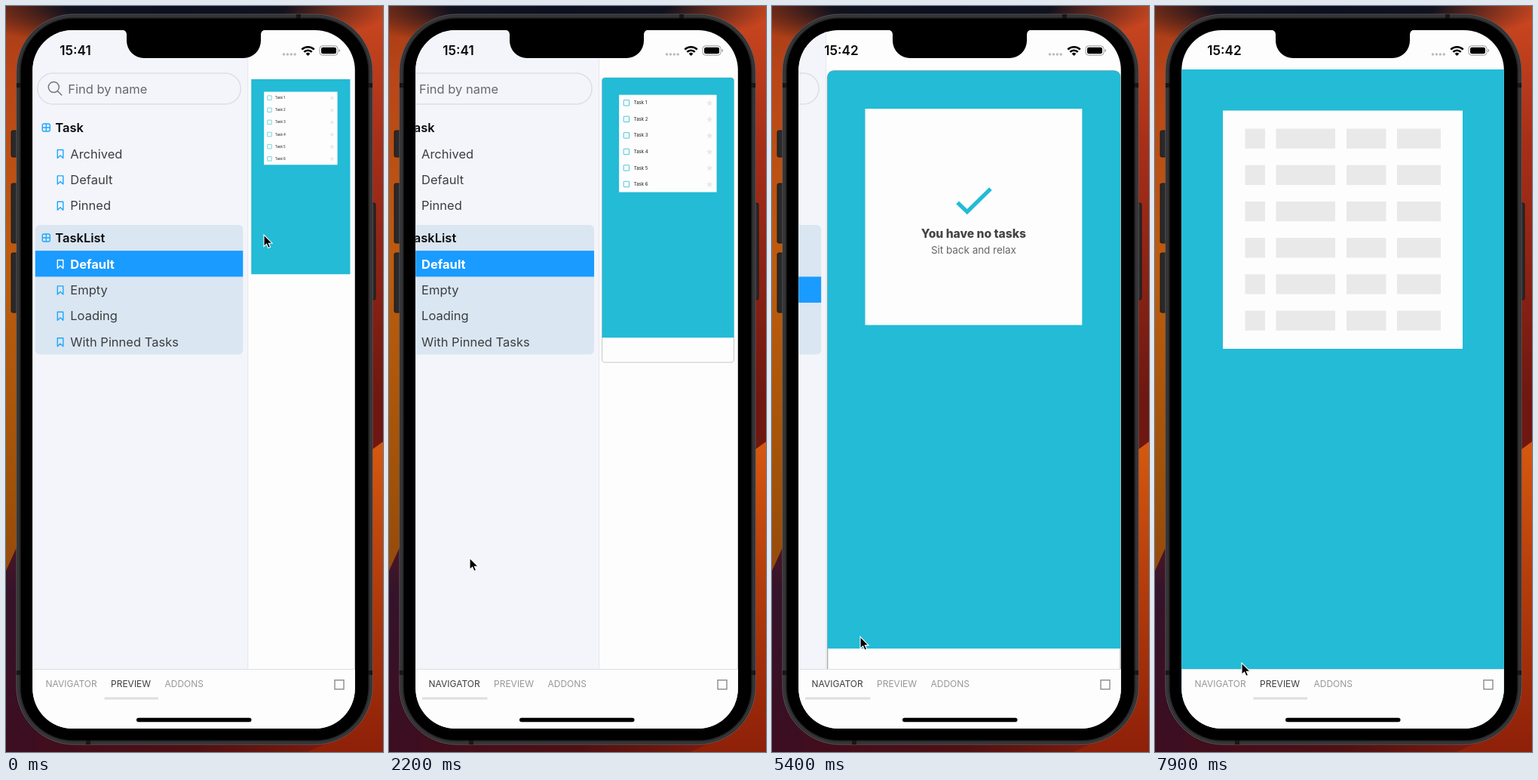
These frames come from a looping animation (500x988 px, 8 s). An HTML page:

```html
<!DOCTYPE html>
<html lang="en">
<head>
<meta charset="utf-8">
<title>Story browser on a phone</title>
<style>
html, body { margin: 0; width: 100%; height: 100%; overflow: hidden; background: #000; }
svg { display: block; width: 100%; height: 100%; }
text { font-family: Inter, "Liberation Sans", sans-serif; font-size: 16.5px; fill: #3c3e42; }
.head { font-weight: 600; fill: #0a0a0c; }
.icon { fill: none; stroke: #1ea7fd; stroke-width: 1.4; stroke-linejoin: round; }
.row rect { fill: none; }
.row.on rect { fill: #1a9bff; }
.row.on text { fill: #fff; font-weight: 700; }
.row.on .icon { stroke: #fff; }
.tab { font-size: 12px; fill: #979797; }
.tab.on { fill: #3d3d3d; }
.mid { text-anchor: middle; }
.scene { display: none; }
.scene.on { display: inline; }
</style>
</head>
<body>
<svg viewBox="0 0 500 988" preserveAspectRatio="none">
  <defs>
    <radialGradient id="night">
      <stop offset="0" stop-color="#0b1020"/><stop offset=".5" stop-color="#10121f"/>
      <stop offset="1" stop-color="#2a1518" stop-opacity="0"/>
    </radialGradient>
    <linearGradient id="left" x2="0" y2="1">
      <stop offset="0" stop-color="#a53a16"/><stop offset=".1" stop-color="#b94518"/>
      <stop offset=".38" stop-color="#bd5c0e"/><stop offset=".7" stop-color="#a05208"/>
      <stop offset="1" stop-color="#8b4010"/>
    </linearGradient>
    <linearGradient id="right" x2="0" y2="1">
      <stop offset="0" stop-color="#cb4820"/><stop offset=".2" stop-color="#a82f18"/>
      <stop offset=".58" stop-color="#6e1811"/>
    </linearGradient>
    <linearGradient id="low" x2="0" y2="1">
      <stop offset="0" stop-color="#d6590f"/><stop offset=".4" stop-color="#b8400c"/>
      <stop offset="1" stop-color="#8e2009"/>
    </linearGradient>
    <linearGradient id="plum" x2="0" y2="1">
      <stop offset="0" stop-color="#5a1a20"/><stop offset=".35" stop-color="#35132a"/>
      <stop offset="1" stop-color="#3d0d20"/>
    </linearGradient>
    <linearGradient id="base">
      <stop offset="0" stop-color="#3d0d20"/><stop offset=".5" stop-color="#4e1013"/>
      <stop offset="1" stop-color="#8e2009"/>
    </linearGradient>
    <clipPath id="screen"><rect x="35.3" y="32" width="427.5" height="925" rx="53"/></clipPath>
  </defs>

  <!-- wallpaper -->
  <rect width="500" height="988" fill="url(#base)"/>
  <rect width="250" height="900" fill="url(#left)"/>
  <rect x="250" width="250" height="900" fill="url(#right)"/>
  <ellipse cx="225" cy="0" rx="290" ry="60" fill="url(#night)"/>
  <path d="M0 748L40 660V988H0Z" fill="url(#plum)"/>
  <path d="M500 577L460 606V960L400 988H500Z" fill="url(#low)"/>

  <!-- phone body -->
  <g fill="#29292b" stroke="#111" stroke-width=".8">
    <rect x="7" y="165" width="10" height="35" rx="2"/>
    <rect x="7" y="235" width="10" height="79" rx="2"/>
    <rect x="7" y="327" width="10" height="79" rx="2"/>
    <rect x="482" y="261" width="8" height="128" rx="2"/>
  </g>
  <rect x="14" y="11" width="472" height="967" rx="76" fill="#28282a" stroke="#58585a"/>
  <rect x="16.5" y="13.5" width="467" height="962" rx="73.5" fill="none" stroke="#39393b" stroke-width="2"/>
  <path d="M14 105h6M480 105h6M14 883h6M480 883h6M388 11v6M109 972v6" stroke="#171719" stroke-width="6"/>
  <rect x="19.5" y="16.5" width="461" height="956" rx="70" fill="#000"/>

  <g clip-path="url(#screen)">
    <rect x="35" y="32" width="428" height="925" fill="#fdfdfd"/>
    <g id="side">
      <rect x="34" y="32" width="289.5" height="847" fill="#f3f5fb"/>
      <path d="M323.5 32V879" stroke="#e4e6ec"/>
      <rect x="44.5" y="89" width="269.5" height="41" rx="20.5" fill="none" stroke="#dcdfe2" stroke-width="1.5"/>
      <g fill="none" stroke="#73777c" stroke-width="1.5" stroke-linecap="round">
        <circle cx="66" cy="107.5" r="7"/><path d="M71.2 112.7L76.5 118"/>
      </g>
      <text x="85" y="115.5" style="fill:#65696e">Find by name</text>
      <rect x="41.5" y="290" width="275.5" height="171.5" rx="6" fill="#dae6f1"/>
    </g>
    <g id="preview">
      <rect id="sheet" width="428" height="923" fill="#fdfdfd" stroke="#aaa" stroke-width="1.6"/>
      <path id="teal" fill="#23bbd6"/>
      <g id="content">
        <rect id="card" x="55" y="54.5" height="315.5" fill="#fdfdfd"/>
        <g class="scene" id="tasks"></g>
        <g class="scene" id="empty">
          <path d="M190 191.3L204 204.8L238.3 171.2" fill="none" stroke="#23bbd6" stroke-width="5.8"/>
          <text class="mid" x="213.5" y="242.6" style="font-size:17.2px;font-weight:800;fill:#454545">You have no tasks</text>
          <text class="mid" x="213.5" y="266.2" style="font-size:14.8px;fill:#666">Sit back and relax</text>
        </g>
        <g class="scene" id="loading" fill="#e9e9e9"></g>
      </g>
    </g>

    <!-- status bar -->
    <text id="clock" class="mid head" x="92" y="65.3" style="font-size:17.2px"></text>
    <path d="M368.5 64H384" stroke="#bdbdbf" stroke-width="3.6" stroke-linecap="round" stroke-dasharray="0 4.9"/>
    <g fill="none" stroke="#000" stroke-width="2.6">
      <path d="M392.3 57.6a11.7 11.7 0 0 1 16.4 0M395.3 60.9a7.4 7.4 0 0 1 10.4 0"/>
      <path d="M400.5 66L397.7 63.2a4 4 0 0 1 5.6 0Z" fill="#000" stroke="none"/>
    </g>
    <rect x="416" y="52.8" width="24" height="12.4" rx="3.8" fill="none" stroke="#999"/>
    <rect x="418" y="54.8" width="20" height="8.4" rx="2.2"/>
    <path d="M441.5 57v4q1.700-.6 1.700-2t-1.700-2" fill="#999"/>

    <!-- tab bar -->
    <rect x="35" y="878" width="428" height="80" fill="#fdfdfd"/>
    <path d="M35 878.5H463" stroke="#dcdfe4"/>
    <rect id="mark" y="915.5" height="3" fill="#dedede"/>
    <text class="tab" x="52.5" y="901.5">NAVIGATOR</text>
    <text class="tab" x="139" y="901.5">PREVIEW</text>
    <text class="tab" x="210.5" y="901.5">ADDONS</text>
    <rect x="436" y="892.8" width="12" height="12" fill="none" stroke="#929292" stroke-width="1.5"/>
    <rect x="173" y="942.7" width="152.5" height="5.6" rx="2.8"/>
  </g>
  <path d="M154 31.5q6 .5 6 7V46a23 23 0 0 0 23 23H315a23 23 0 0 0 23-23V38.5q0-6.500 6-7Z"/>

  <path id="cursor" d="M0 0V15.500L3.600 12.200L5.900 17.500L8.600 16.300L6.300 11.200H11Z" stroke="#fff" stroke-width="1.1"/>
</svg>

<script>
const $ = id => document.getElementById(id);
const range = n => [...Array(n).keys()];
const LOOP = 8000, SLIDE = 400, FADE = 250;

// [start, side]: 1 opens the preview, 0 the navigator
const slides = [[-20, 1], [1900, 0], [4035, 1], [5311, 0], [7050, 1]];
// [time, story row, scene]
const picks = [[-9999, 0, 'tasks'], [2950, 1, 'empty'], [6250, 2, 'loading']];
const path = [
  [0, 342, 303], [350, 342, 303], [1300, 94, 717], [1700, 86, 897], [1950, 86, 897],
  [2750, 153, 368], [3150, 153, 368], [3900, 134, 897], [4080, 134, 897], [4300, 132, 915],
  [4600, 128, 922], [5150, 108, 897], [5310, 112, 890], [5400, 117, 836], [6100, 150, 406],
  [6280, 150, 406], [6400, 152, 443], [6950, 134, 897], [7200, 134, 897], [7900, 115, 870]
];

const grid = y => `<g class="icon"><rect x="51" y="${y - 5}" width="10" height="10" rx="2"/>
  <path d="M56 ${y - 5}v10M51 ${y}h10"/></g>`;
const heading = (name, y) => grid(y) + `<text class="head" x="68" y="${y + 6}">${name}</text>`;
const story = (name, y) => `<g class="row"><rect x="41.5" y="${y - 17.4}" width="275.5" height="34.4"/>
  <path class="icon" d="M71 ${y - 5}h7.5v11l-3.75-3.5l-3.75 3.5z"/>
  <text x="88" y="${y + 6}">${name}</text></g>`;
const list = (names, y) => names.map((name, i) => story(name, y + i * 34.4)).join('');

$('side').insertAdjacentHTML('beforeend',
  heading('Task', 161) + list(['Archived', 'Default', 'Pinned'], 195.5) +
  heading('TaskList', 307) + list(['Default', 'Empty', 'Loading', 'With Pinned Tasks'], 341.5));

const star = (x, y) => range(10).map(i => {
  const r = i % 2 ? 4.6 : 11.3, a = i * Math.PI / 5;
  return [x + r * Math.sin(a), y - r * Math.cos(a)];
}).join(' ');

$('tasks').innerHTML = range(6).map(i => {
  const y = 80.6 + i * 52.7;
  return `<rect x="70" y="${y - 9}" width="18" height="18" rx="1" fill="none" stroke="#23bbd6" stroke-width="2"/>
    <text x="103.5" y="${y + 5.2}" style="font-size:14.6px;fill:#161616">Task ${i + 1}</text>
    <polygon points="${star(349, y + 1)}" fill="#e9e9e9"/>`;
}).join('');

$('loading').innerHTML = range(6).map(i =>
  [[84.5, 26.5], [125.5, 78.5], [219, 52.5], [286, 58]].map(([x, w]) =>
    `<rect x="${x}" y="${78.5 + i * 48.2}" width="${w}" height="26.3"/>`).join('')).join('');

const rows = [...document.querySelectorAll('.row')].slice(3);
const tabs = document.querySelectorAll('.tab');
const scenes = document.querySelectorAll('.scene');

// cubic-bezier(.42, 0, 1, 1)
function easeIn(x) {
  let lo = 0, hi = 1;
  for (let i = 0; i < 20; i++) {
    const s = (lo + hi) / 2;
    if (1.26 * s * (1 - s) ** 2 + 3 * s * s * (1 - s) + s ** 3 < x) lo = s; else hi = s;
  }
  return 3 * lo * lo - 2 * lo ** 3;
}
const easeInOut = u => u < .5 ? easeIn(2 * u) / 2 : 1 - easeIn(2 - 2 * u) / 2;
const latest = (events, t) => events.filter(e => e[0] <= t).pop();
const place = (id, value) => $(id).setAttribute('transform', value);

function cursorAt(t) {
  const i = path.findIndex(k => k[0] > t);
  if (i < 0) return path[path.length - 1].slice(1);
  const [a, b] = [path[i - 1], path[i]], u = (t - a[0]) / (b[0] - a[0]);
  return [1, 2].map(n => a[n] + (b[n] - a[n]) * u);
}

function draw(t) {
  const [start, side] = latest(slides, t);
  const moved = easeInOut(Math.min(1, (t - start) / SLIDE));
  const p = side ? moved : 1 - moved;
  place('side', `translate(${-290 * p})`);
  place('preview', `translate(${328 - 293 * p} ${97 - 13 * p}) scale(${.3 + .7 * p})`);

  // beside the navigator the sheet has a border, which insets its content
  const r = side ? 0 : 10;
  $('sheet').setAttribute('rx', r);
  $('sheet').style.display = side ? 'none' : '';
  $('teal').setAttribute('d', `M0 843V${r}Q0 0 ${r} 0H${428 - r}Q428 0 428 ${r}V843Z`);
  $('card').setAttribute('width', side ? 318 : 317);
  place('content', `translate(0 ${1 - side})`);
  tabs.forEach((tab, i) => tab.classList.toggle('on', i === side));
  $('mark').setAttribute('x', side ? 130.5 : 44);
  $('mark').setAttribute('width', side ? 71.5 : 86.5);

  const [picked, row, scene] = latest(picks, t);
  rows.forEach((el, i) => {
    el.classList.toggle('on', i === row);
    el.style.opacity = i === row ? 1 - .4 * Math.max(0, 1 - (t - picked) / FADE) : 1;
  });
  scenes.forEach(el => el.classList.toggle('on', el.id === scene));
  $('loading').style.opacity = .65 + .35 * Math.cos((t - 7900) * Math.PI / 500);

  $('clock').textContent = t < 4900 ? '15:41' : '15:42';
  place('cursor', `translate(${cursorAt(t)})`);
}

function frame(now) {
  draw(now % LOOP);
  requestAnimationFrame(frame);
}
frame(0);
</script>
</body>
</html>
```
